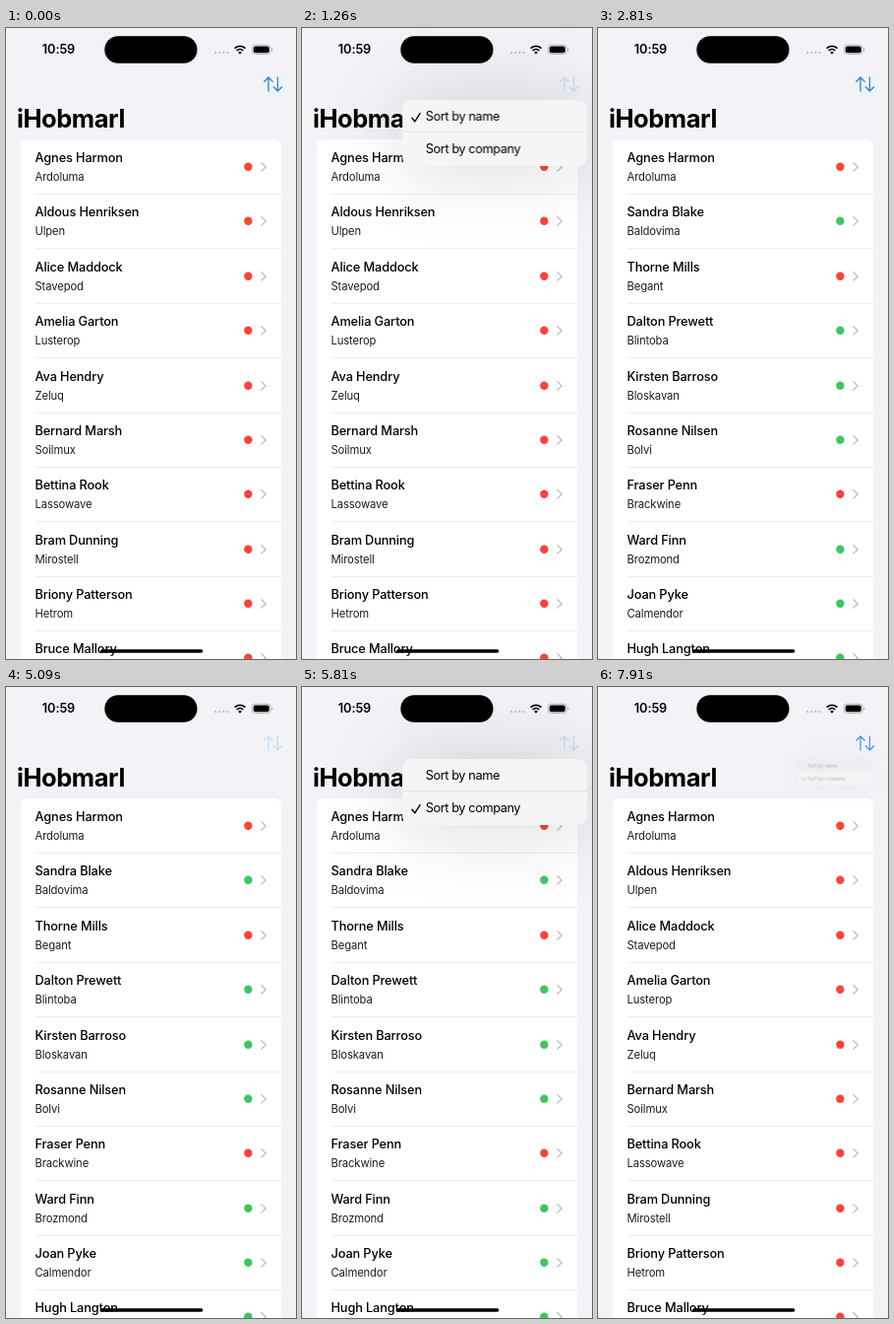
Animation, 295 px wide and 640 px high, one loop 8000 ms. Source, as an HTML page:

```html
<!DOCTYPE html>
<html lang="en">
<head>
<meta charset="utf-8">
<title>Contacts sorting</title>
<style>
  html, body { margin: 0; width: 100%; height: 100%; overflow: hidden; }
  body { background: #f3f3f7; font-family: Inter, Roboto, sans-serif; color: #000; }
  #stage { position: relative; width: 295px; height: 640px; overflow: hidden; }
  #stage > *, .row > *, .item > * { position: absolute; white-space: nowrap; }

  .icons { left: 0; top: 0; }
  .clock { left: 33px; width: 41px; top: 14px; text-align: center;
    font: 600 12.75px/16px Inter, Roboto, sans-serif; letter-spacing: -.1px; }
  h1 { margin: 0; left: 11px; top: 77.3px; letter-spacing: -.45px;
    font: 700 25.5px/30px Inter, Roboto, sans-serif; }

  .list { left: 15px; top: 113px; width: 265px; height: 560px;
    background: #fff; border-radius: 7.5px; }
  .row { position: relative; height: 55.39px; }
  .row + .row::before { content: ""; position: absolute; left: 15px; right: 0; top: -.3px;
    height: .8px; background: #ededef; }
  .name { left: 14.5px; top: 11px; font-weight: 500; font-size: 12.75px; line-height: 16px;
    letter-spacing: -.12px; }
  .firm { left: 14.5px; top: 31px; font-size: 11.25px; line-height: 14px;
    letter-spacing: -.12px; color: #1c1c1c; }
  .marks { left: 220px; top: 0; }

  .menu { left: 101.5px; top: 73px; width: 187.5px; height: 66.5px; border-radius: 9.5px;
    background: #f5f5f6; box-shadow: 0 2px 80px rgba(0, 0, 0, .17);
    transform-origin: 169.5px 0; }
  .item { position: relative; height: 33.25px; font-size: 12.75px; line-height: 16px;
    letter-spacing: -.41px; }
  .item span { left: 23.7px; top: 9px; }
  .item svg { left: 0; top: 0; }
  .tint { inset: 0; background: rgba(0, 0, 0, .075); }
  .item:first-child .tint { border-radius: 9.5px 9.5px 0 0; }
  .item:last-child .tint { border-radius: 0 0 9.5px 9.5px; }
  .item:last-child { box-shadow: 0 -.7px #dcdcde; }

  .menu, .sort, .list, .tint, .check { animation: 8s step-end infinite; }
  .menu { animation-name: menu; }
  .sort { animation-name: sort; }
  .by-name { animation-name: by-name; }
  .by-firm { animation-name: by-firm; }
  .tint.a { animation-name: press-a; }
  .tint.b { animation-name: press-b; }
  .check.a { animation-name: check-a; }
  .check.b { animation-name: check-b; }

  @keyframes menu {
    0%      { opacity: 0; transform: scale(.1); }
    7.5%    { opacity: .35; transform: scale(.3); }
    8.875%  { opacity: .9; transform: scale(.8); }
    10.125% { opacity: 1; transform: scale(.97); }
    11.5%   { opacity: 1; transform: scale(1.006); }
    12.75%  { opacity: 1; transform: none; }
    28.125% { opacity: .95; transform: scale(.976); }
    29.5%   { opacity: .27; transform: scale(.4); }
    30.875% { opacity: .04; transform: scale(.2); }
    32.375% { opacity: 0; transform: scale(.1); }
    65%     { opacity: .35; transform: scale(.3); }
    66.375% { opacity: .9; transform: scale(.8); }
    67.875% { opacity: 1; transform: scale(.98); }
    69.25%  { opacity: 1; transform: none; }
    97.375% { opacity: .95; transform: scale(.976); }
    98.875%, 100% { opacity: .27; transform: scale(.4); }
  }
  @keyframes sort {
    0%, 30.875% { opacity: 1; }
    6.25%, 63.625% { opacity: .2; }
    29.5%, 98.875%, 100% { opacity: .8; }
  }
  @keyframes by-name {
    0%, 97.375%, 100% { visibility: visible; }
    28.125% { visibility: hidden; }
  }
  @keyframes by-firm {
    0%, 97.375%, 100% { visibility: hidden; }
    28.125% { visibility: visible; }
  }
  @keyframes press-a { 0% { opacity: 0; } 97.375%, 100% { opacity: 1; } }
  @keyframes press-b { 0%, 32.375%, 100% { opacity: 0; } 28.125% { opacity: 1; } }
  @keyframes check-a { 0% { opacity: 1; } 50%, 100% { opacity: 0; } }
  @keyframes check-b { 0% { opacity: 0; } 50%, 100% { opacity: 1; } }
</style>
</head>
<body>
<div id="stage">
  <div class="list by-name"></div>
  <div class="list by-firm"></div>
  <h1>iHobmarl</h1>
  <div class="clock">10:59</div>

  <svg class="icons" width="295" height="640" fill="none">
    <rect x="100.3" y="8.3" width="94.2" height="27.5" rx="13.75" fill="#000"/>
    <path d="M213 25h14" stroke="#c6c6ca" stroke-width="2.5" stroke-linecap="round" stroke-dasharray="0 4.1"/>
    <g stroke="#000" stroke-width="1.6">
      <path d="M232.5 20.6a7.8 7.8 0 0 1 11 0M234.6 23a5 5 0 0 1 6.8 0"/>
      <path d="M238 26.8l-1.9-2a2.7 2.7 0 0 1 3.8 0z" fill="#000" stroke="none"/>
    </g>
    <rect x="250.3" y="17.2" width="18.8" height="9.4" rx="3" stroke="#a6a6aa" stroke-width=".8"/>
    <rect x="251.7" y="18.6" width="16" height="6.6" rx="1.9" fill="#000"/>
    <path d="M270.3 20.4q1.2.4 1.2 1.5t-1.2 1.5z" fill="#a6a6aa"/>
    <g class="sort" stroke="#1a86f5" stroke-width="1.3" stroke-linecap="round" stroke-linejoin="round">
      <path d="M267 64V50M262.8 54.3L267 50l4.2 4.3"/>
      <path d="M276.4 50v14M272.2 59.7l4.2 4.3 4.2-4.3"/>
    </g>
    <rect x="96" y="630.2" width="104.3" height="3.6" rx="1.8" fill="#000"/>
  </svg>

  <div class="menu">
    <div class="item">
      <div class="tint a"></div>
      <svg class="check a" width="24" height="33" fill="none" stroke="#000" stroke-width="1.4" stroke-linecap="round" stroke-linejoin="round"><path d="M9.8 18.2l3 3.6 5.2-8.2"/></svg>
      <span>Sort by name</span>
    </div>
    <div class="item">
      <div class="tint b"></div>
      <svg class="check b" width="24" height="33" fill="none" stroke="#000" stroke-width="1.4" stroke-linecap="round" stroke-linejoin="round"><path d="M9.8 18.2l3 3.6 5.2-8.2"/></svg>
      <span>Sort by company</span>
    </div>
  </div>
</div>

<script>
  // name, company, online
  const byName = [
    ["Agnes Harmon", "Ardoluma"], ["Aldous Henriksen", "Ulpen"],
    ["Alice Maddock", "Stavepod"], ["Amelia Garton", "Lusterop"],
    ["Ava Hendry", "Zeluq"], ["Bernard Marsh", "Soilmux"],
    ["Bettina Rook", "Lassowave"], ["Bram Dunning", "Mirostell"],
    ["Briony Patterson", "Hetrom"], ["Bruce Mallory", ""]
  ];
  const byFirm = [
    ["Agnes Harmon", "Ardoluma"], ["Sandra Blake", "Baldovima", 1],
    ["Thorne Mills", "Begant"], ["Dalton Prewett", "Blintoba", 1],
    ["Kirsten Barroso", "Bloskavan", 1], ["Rosanne Nilsen", "Bolvi", 1],
    ["Fraser Penn", "Brackwine"], ["Ward Finn", "Brozmond", 1],
    ["Joan Pyke", "Calmendor", 1], ["Hugh Langton", "", 1]
  ];

  const row = ([name, firm, online]) => `
    <div class="row">
      <div class="name">${name}</div>
      <div class="firm">${firm}</div>
      <svg class="marks" width="45" height="55" fill="none">
        <circle cx="11.3" cy="27.8" r="4.2" fill="${online ? "#3bc860" : "#fc4338"}"/>
        <path d="M24.9 23.7l4.3 4.2-4.3 4.2" stroke="#c2c2c6" stroke-width="1.4"
          stroke-linecap="round" stroke-linejoin="round"/>
      </svg>
    </div>`;

  const fill = (sel, rows) => {
    document.querySelector(sel).innerHTML = rows.map(row).join("");
  };
  fill(".by-name", byName);
  fill(".by-firm", byFirm);
</script>
</body>
</html>
```
